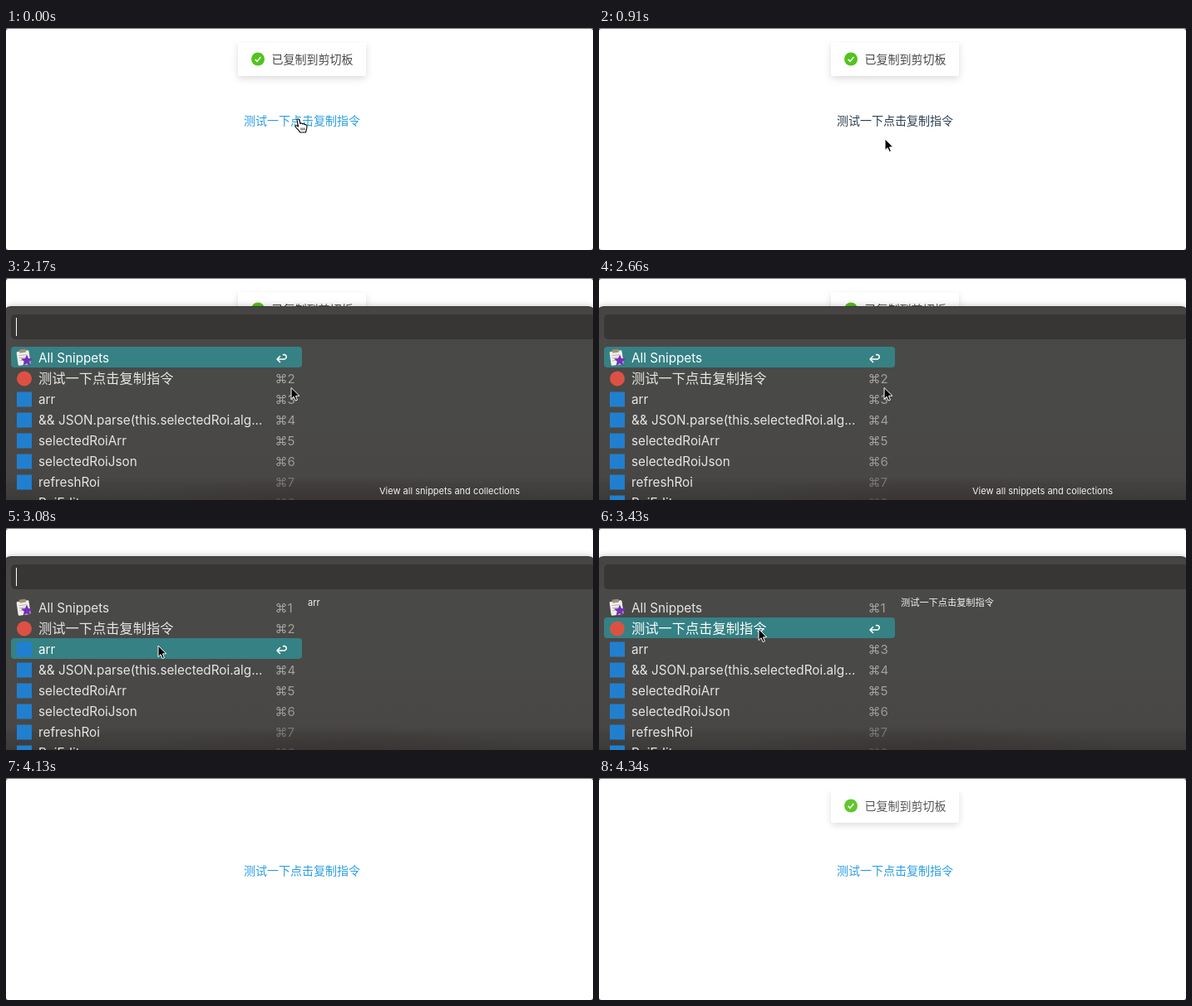
Recreate the animation shown at these times as an HTML page. Size 706 by 268 pixels, loop 4.41 s.

```html
<!DOCTYPE html>
<html lang="zh-CN">
<head>
<meta charset="utf-8">
<title>Copy directive and snippet panel</title>
<style>
  html, body { margin: 0; width: 100%; height: 100%; overflow: hidden; background: #444; }
  svg { display: block; width: 706px; height: 268px; }
  text { white-space: pre; }
  .cjk { font-family: "Noto Sans CJK SC", "Noto Sans CJK", sans-serif; }
  .label { font-family: Inter, sans-serif; font-size: 15.25px; fill: #e6e6e4; }
  .label.cjk { font-family: "Noto Sans CJK SC", "Noto Sans CJK", sans-serif; font-size: 16.25px; font-weight: 500; }
  .key { font-family: Inter, "DejaVu Sans", sans-serif; font-size: 15px; fill: #a2a19f; }
  .small { font-family: Inter, "Noto Sans CJK SC", "Noto Sans CJK", sans-serif; font-size: 11px; fill: #f2f2f0; }
  .small.cjk { font-family: "Noto Sans CJK SC", "Noto Sans CJK", sans-serif; font-size: 11.2px; font-weight: 500; }
  .return { fill: none; stroke: #fff; stroke-width: 1.6; stroke-linecap: round; stroke-linejoin: round; }
</style>
</head>
<body>
<svg viewBox="0 0 706 268">
  <defs>
    <filter id="toastShadow" x="-20%" y="-40%" width="140%" height="200%">
      <feDropShadow dx="0" dy="3" stdDeviation="4" flood-color="#000" flood-opacity=".14"/>
    </filter>
    <filter id="panelShadow" x="-5%" y="-10%" width="110%" height="120%">
      <feDropShadow dx="0" dy="1" stdDeviation="4" flood-color="#000" flood-opacity=".3"/>
    </filter>
    <linearGradient id="panelFill" x1="0" y1="0" x2="0" y2="1">
      <stop offset="0" stop-color="#454443"/>
      <stop offset=".2" stop-color="#4a4947"/>
      <stop offset=".78" stop-color="#484745"/>
      <stop offset=".9" stop-color="#3b3938"/>
    </linearGradient>
    <radialGradient id="panelGlow">
      <stop offset="0" stop-color="#38292c" stop-opacity=".4"/>
      <stop offset="1" stop-color="#38292c" stop-opacity="0"/>
    </radialGradient>
    <clipPath id="belowTop"><rect x="0" y="16" width="706" height="252"/></clipPath>
  </defs>

  <rect width="706" height="268" fill="#444"/>
  <rect width="706" height="1" fill="#777"/>
  <rect y="1" width="706" height="267" rx="3" fill="#fff"/>

  <g clip-path="url(#belowTop)">
    <g id="toast">
      <rect x="279" y="17" width="154" height="41" rx="3" fill="#fff" filter="url(#toastShadow)"/>
      <circle cx="303" cy="37.5" r="8" fill="#52c41a"/>
      <path d="M299.5 37.7 302 40.2 306.4 35" fill="none" stroke="#fff" stroke-width="1.6"/>
      <text class="cjk" x="319.5" y="42.8" font-size="14" fill="#484848">已复制到剪切板</text>
    </g>
  </g>
  <text id="link" class="cjk" x="286" y="116.6" font-size="14">测试一下点击复制指令</text>

  <g id="panel">
    <rect x="-4" y="34.5" width="714" height="260" rx="10" fill="url(#panelFill)" stroke="#3a3938" filter="url(#panelShadow)"/>
    <ellipse cx="400" cy="272" rx="240" ry="34" fill="url(#panelGlow)"/>
    <rect x="6" y="44" width="702" height="30" rx="5" fill="#373635"/>
    <rect id="caret" x="12" y="48" width="1" height="22" fill="#fff"/>
    <rect id="highlight" x="6" y="83" width="350" height="25" rx="4" fill="#358184"/>
    <g id="rows"></g>
    <text id="hint" class="small" x="533.5" y="261" text-anchor="middle">View all snippets and collections</text>
    <text id="preview" x="363" y="94"></text>
  </g>

  <path id="arrow" d="M0 0V13.6L3.1 10.7 5.2 15.6 7.4 14.6 5.4 9.9 9.8 9.7Z" fill="#000" stroke="#fff"/>
  <g id="hand" fill="#fff" stroke="#000" stroke-width="1.1" stroke-linejoin="round">
    <path d="M0 1C0-.6 2.4-.6 2.8 1L4 5.5C4.5 4.6 6.4 4.7 6.8 6 7.6 5.2 9.2 5.5 9.5 6.8 10.6 6.2 12 7 12 8.6 12 11.5 11 13 10.6 16H3.6C2.5 13.2-.4 11.4-2 9.2-2.6 7.8-.8 7.2.6 8.2L1.6 9Z"/>
    <path d="M5 10.5V13.5M7 10.5V13.5M9 10.5V13.5" stroke-width=".8"/>
  </g>
</svg>
<script>
const LOOP = 4410, STEP = 70, ROW = 25;
const $ = id => document.getElementById(id);
const show = (node, on) => { node.style.display = on ? '' : 'none'; };
const place = (node, x, y) => node.setAttribute('transform', `translate(${x} ${y})`);

const COPIED = '测试一下点击复制指令';
const labels = ['All Snippets', COPIED, 'arr', '&& JSON.parse(this.selectedRoi.alg...',
  'selectedRoiArr', 'selectedRoiJson', 'refreshRoi', 'RoiEditor'];

const clipboard = `<g transform="rotate(-8 21 96)">
  <rect x="13.5" y="88" width="15" height="17" rx="1.5" fill="#f1efec"/>
  <rect x="17" y="86" width="8" height="4" rx="1" fill="#a3907c"/>
  <path d="M16 93H25M16 96H23M16 99H21" stroke="#bbb6b0"/></g>
  <path d="M25 92.5 27 97 32 97.5 28.3 100.8 29.4 105.7 25 103.2 20.6 105.7 21.7 100.8 18 97.5 23 97Z" fill="#7430b8"/>`;
const browserIcon = '<circle cx="22" cy="96.5" r="9" fill="#dd5144"/>';
const editorIcon = '<rect x="13" y="87.5" width="18" height="18" fill="#2080cf"/>';

$('rows').innerHTML = labels.map((label, i) => {
  const cjk = label === COPIED;
  const dim = i < 5 ? 1 : [.9, .55, .3][i - 5];
  return `<g transform="translate(0 ${i * ROW})">
    <g class="icon">${[clipboard, browserIcon][i] || editorIcon}</g>
    <text class="label${cjk ? ' cjk' : ''}" x="39" y="102.2">${label.replace(/&/g, '&amp;')}</text>
    <text class="key" x="323.5" y="102" opacity="${dim}">⌘${i + 1}</text>
    <path class="return" d="M329.5 94.5 326 98 329.5 101.5M326 98H335.2A2.8 2.8 0 0 0 335.2 92.6H333.5"/>
  </g>`;
}).join('');
const rows = [...$('rows').children].map(row => ({
  icon: row.querySelector('.icon'), label: row.querySelector('.label'),
  key: row.querySelector('.key'), back: row.querySelector('.return')
}));

// Each key: time, x, y
const pointerKeys = [
  [0, 350, 110], [630, 350, 110], [770, 348, 119], [910, 344, 134], [1680, 344, 134],
  [1750, 343, 132.5], [2660, 343, 132.5], [2870, 235, 146], [3080, 183, 142],
  [3220, 183, 141], [3430, 192, 122], [3500, 205, 122], [3780, 400, 150], [3990, 530, 272]
];
// Each key: time, vertical shift, opacity
const toastKeys = [
  [0, 0, 1], [2800, 0, 1], [2940, -2, .6], [3080, -5, 0],
  [4200, -24, 0], [4270, -12, .55], [4340, -4, .92], [4410, 0, 1]
];

function sample(keys, t) {
  const i = keys.findIndex(k => k[0] > t);
  if (i < 0) return keys[keys.length - 1].slice(1);
  const a = keys[i - 1], b = keys[i], p = (t - a[0]) / (b[0] - a[0]);
  return [1, 2].map(n => a[n] + (b[n] - a[n]) * p);
}

function drawPanel(t) {
  const selected = t < 2730 ? 0 : t < 3290 ? 2 : 1;
  const loaded = t < 1960 ? 0 : Math.ceil(((t - 1960) / STEP + 1) * 1.4);
  show($('caret'), t < 2380 || (t >= 2940 && t < 3430) || t >= 4060);
  place($('highlight'), 0, selected * ROW);
  rows.forEach((row, i) => {
    show(row.icon, i <= loaded);
    show(row.key, i !== selected);
    show(row.back, i === selected);
    row.label.style.fill = i === selected ? '#fff' : '';
  });
  show($('hint'), selected === 0);
  $('preview').textContent = selected ? labels[selected] : '';
  $('preview').setAttribute('class', selected === 1 ? 'small cjk' : 'small');
}

function draw(t) {
  const open = t >= 1750 && t < 4130;
  const linked = t < 840 || t >= 4130;
  show($('panel'), open);
  if (open) drawPanel(t);

  const [shift, opacity] = sample(toastKeys, t);
  place($('toast'), 0, shift);
  $('toast').setAttribute('opacity', opacity);
  $('link').setAttribute('fill', linked ? '#279de3' : '#2c3e50');

  const [x, y] = sample(pointerKeys, t);
  show($('hand'), t < 840);
  show($('arrow'), t >= 840 && t < 3990);
  place($('hand'), x, y);
  place($('arrow'), x, y);
}

function tick() {
  const t = performance.now() % LOOP;
  draw(Math.floor(t / STEP) * STEP);
  requestAnimationFrame(tick);
}
tick();
</script>
</body>
</html>
```
